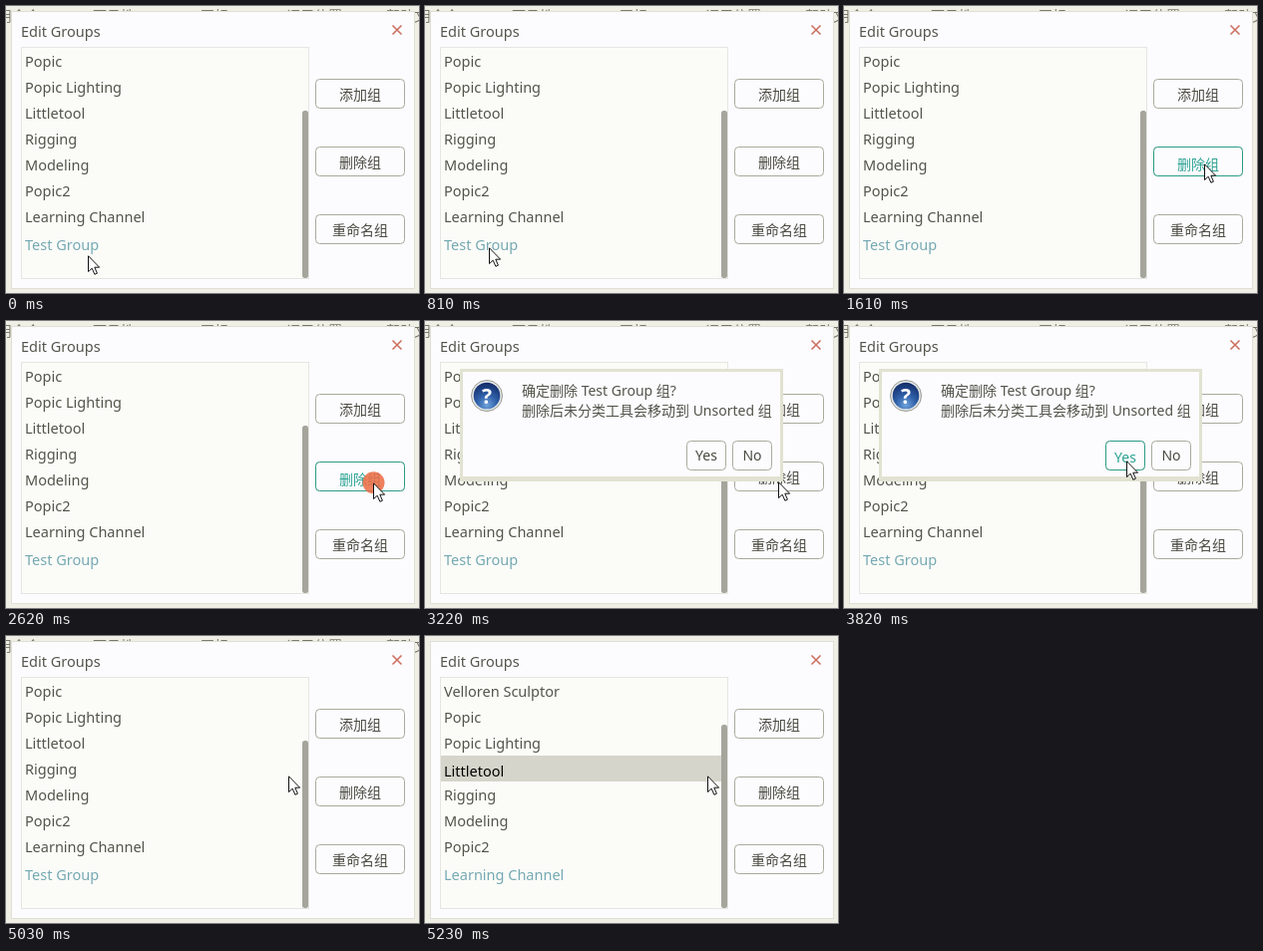
An HTML page that plays this animation: 414 by 288 pixels, repeating every 6.84 s.

```html
<!DOCTYPE html>
<html lang="zh-CN">
<head>
<meta charset="utf-8">
<title>Edit Groups</title>
<style>
  html, body { margin: 0; width: 100%; height: 100%; overflow: hidden; background: #efefe6; }
  svg { display: block; width: 414px; height: 288px; }
  text { font: 14px "Noto Sans", "Noto Sans CJK SC", "Noto Sans CJK", sans-serif; fill: #52554a; white-space: pre; }
  .rows text, .title { font-size: 14.5px; }
  .rows .on { fill: #74a9b2; }
  .rows .hot text { fill: #000; }
  .hot rect { fill: #d6d5cb; }
  .btn text { text-anchor: middle; fill: #4a4a40; }
  .btn rect { fill: #fcfbfe; stroke: #aaaa9c; }
  .btn.over rect { stroke: #2b9c86; }
  .btn.over text { fill: #2ba392; }

  /* every state switches abruptly on one shared 6840 ms clock */
  .t { animation: 6840ms step-end infinite; }
  .before { animation-name: before; }
  .after { animation-name: after; }
  .popic { animation-name: popic; }
  .model { animation-name: model; }
  .del { animation-name: del; }
  .ask { animation-name: ask; }
  .yes { animation-name: yes; }
  .click { animation-name: click; }
  .arrow { animation-name: arrow; }

  @keyframes before { 0% { opacity: 1 } 76.46%, to { opacity: 0 } }
  @keyframes after { 0% { opacity: 0 } 76.46%, to { opacity: 1 } }
  @keyframes popic { 0%, 20.61%, to { opacity: 0 } 17.69% { opacity: 1 } }
  @keyframes model { 0%, 23.53%, to { opacity: 0 } 20.61% { opacity: 1 } }
  @keyframes del { 0%, 41.22%, to { opacity: 0 } 23.53% { opacity: 1 } }
  @keyframes ask { 0%, 73.53%, to { opacity: 0 } 41.22% { opacity: 1 } }
  @keyframes yes { 0%, 73.53%, to { opacity: 0 } 52.92% { opacity: 1 } }
  @keyframes click {
    0%, 11.84%, 41.22%, 73.53%, to { opacity: 0 }
    8.91%, 38.3%, 67.69% { opacity: .86 }
  }
  @keyframes arrow {
    0% { transform: translate(82px, 250px) }
    5.84% { transform: translate(74px, 247px) }
    8.91% { transform: translate(64px, 242px) }
    14.76% { transform: translate(66px, 242px) }
    17.69% { transform: translate(181px, 194px) }
    20.61% { transform: translate(284px, 164px) }
    23.53% { transform: translate(361px, 158px) }
    26.46% { transform: translate(375px, 161px) }
    32.3% { transform: translate(368px, 162px) }
    47.07% { transform: translate(354px, 161px) }
    49.99% { transform: translate(324px, 158px) }
    52.92% { transform: translate(294px, 146px) }
    55.84%, to { transform: translate(283px, 140px) }
  }
</style>
</head>
<body>
<svg viewBox="0 0 414 288">
  <defs>
    <radialGradient id="orb" cx=".5" cy=".85" r=".85">
      <stop offset="0" stop-color="#6fa3dc"/>
      <stop offset=".45" stop-color="#2f5fa8"/>
      <stop offset="1" stop-color="#122a66"/>
    </radialGradient>
  </defs>

  <rect width="414" height="288" fill="#efefe6"/>
  <g class="t before">
    <text y="15" style="fill:#77776a"><tspan x="-8">用命令</tspan><tspan x="87">可见性</tspan><tspan x="195">图标</tspan><tspan x="281">调用位置</tspan><tspan x="381">帮助文</tspan></text>
  </g>

  <!-- window -->
  <rect x="5.5" y="5.5" width="404" height="278" fill="#fcfbfe" stroke="#e0e0d6"/>
  <text class="title" x="15" y="31">Edit Groups</text>
  <path d="M387.5 19.5l9 9m0-9l-9 9" stroke="#cc7060" stroke-width="1.6"/>
  <rect x="15.5" y="41.5" width="288" height="232" fill="#fbfbf8" stroke="#e5e5e2"/>

  <g class="rows t before">
    <text y="61"><tspan x="19">Popic</tspan><tspan x="19" dy="26">Popic Lighting</tspan><tspan x="19" dy="26">Littletool</tspan><tspan x="19" dy="26">Rigging</tspan><tspan x="19" dy="26">Modeling</tspan><tspan x="19" dy="26">Popic2</tspan><tspan x="19" dy="26">Learning Channel</tspan></text>
    <text class="on" x="19" y="245">Test Group</text>
    <g class="hot t popic">
      <rect x="16" y="172" width="281" height="26"/>
      <text x="19" y="193">Popic2</text>
    </g>
    <g class="hot t model">
      <rect x="16" y="146" width="281" height="26"/>
      <text x="19" y="167">Modeling</text>
    </g>
    <rect x="297" y="105" width="6" height="168" rx="2.5" fill="#a5a59c"/>
  </g>

  <g class="rows t after">
    <g class="hot">
      <rect x="16" y="120" width="281" height="26"/>
      <text x="19" y="141">Littletool</text>
    </g>
    <text y="61"><tspan x="19">Velloren Sculptor</tspan><tspan x="19" dy="26">Popic</tspan><tspan x="19" dy="26">Popic Lighting</tspan><tspan x="19" dy="52">Rigging</tspan><tspan x="19" dy="26">Modeling</tspan><tspan x="19" dy="26">Popic2</tspan></text>
    <text class="on" x="19" y="245">Learning Channel</text>
    <rect x="297" y="89" width="6" height="184" rx="2.5" fill="#a5a59c"/>
  </g>

  <g class="btn">
    <rect x="310.5" y="73.5" width="89" height="29" rx="4"/>
    <text x="355" y="94">添加组</text>
    <rect x="310.5" y="141.5" width="89" height="29" rx="4"/>
    <text x="355" y="162">删除组</text>
    <rect x="310.5" y="209.5" width="89" height="29" rx="4"/>
    <text x="355" y="230">重命名组</text>
  </g>
  <g class="btn over t del">
    <rect x="310.5" y="141.5" width="89" height="29" rx="4"/>
    <text x="355" y="164">删除组</text>
  </g>

  <!-- confirmation -->
  <g class="t ask">
    <rect x="35" y="48" width="324" height="113" fill="#e2e2d2"/>
    <rect x="38" y="51" width="318" height="105" fill="#fcfbfe"/>
    <circle cx="62" cy="75" r="15.5" fill="#e4e6e6" stroke="#989c94"/>
    <circle cx="62" cy="75" r="13.3" fill="url(#orb)"/>
    <text x="62" y="82.5" text-anchor="middle" style="font-size:21px;font-weight:700;fill:#fff">?</text>
    <text x="97" y="75">确定删除 Test Group 组?</text>
    <text x="97" y="95">删除后未分类工具会移动到 Unsorted 组</text>
    <g class="btn">
      <rect x="262.5" y="120.5" width="39" height="29" rx="4"/>
      <text x="282" y="140">Yes</text>
      <rect x="308.5" y="120.5" width="39" height="29" rx="4"/>
      <text x="328" y="140">No</text>
    </g>
    <g class="btn over t yes">
      <rect x="262.5" y="120.5" width="39" height="29" rx="4"/>
      <text x="282" y="142">Yes</text>
    </g>
  </g>

  <g class="t arrow">
    <circle class="t click" cx=".5" cy=".3" r="11" fill="#ee6c44"/>
    <path d="M.5 .8V16.6L4.2 13.2L6.9 19.3L9.4 18.2L6.8 12.2H11.6Z" fill="#fff" stroke="#111"/>
  </g>
</svg>
</body>
</html>
```
